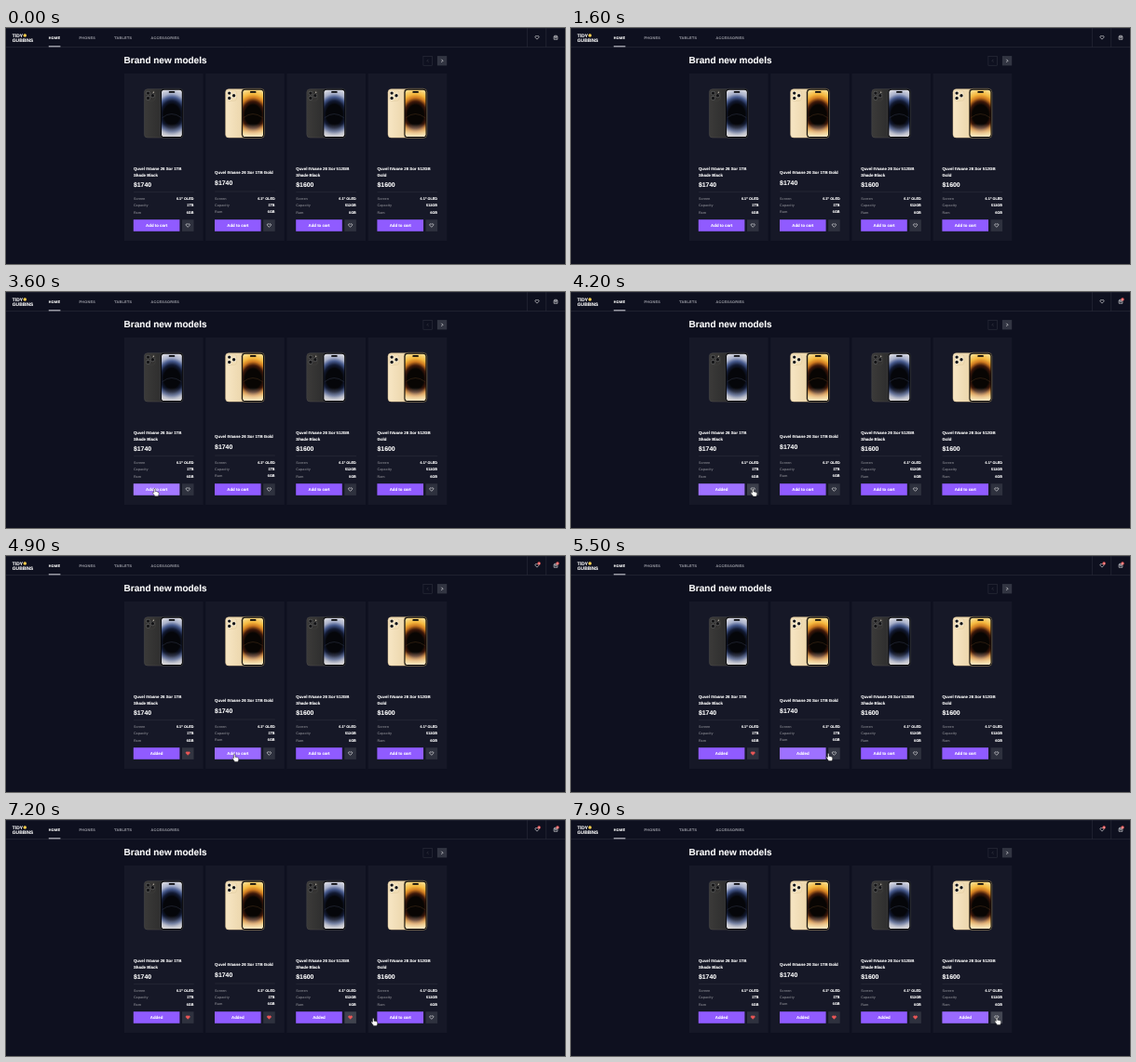
Animation, 600 px wide and 254 px high, one loop 8 s. Source, as an HTML page:

```html
<!DOCTYPE html>
<html lang="en">
<head>
<meta charset="utf-8">
<title>Shop</title>
<style>
  html, body { margin: 0; width: 100%; height: 100%; overflow: hidden; background: #0e101f; }
  svg { display: block; width: 100vw; height: 100vh; }
  text { font: 700 3.75px "Liberation Sans", Arial, sans-serif; fill: #fff; stroke: #fff; stroke-width: .1; text-rendering: geometricPrecision; }
  .title { font-size: 10px; }
  .logo { font-size: 4.9px; }
  .nav { letter-spacing: .3px; }
  .dim { fill: #8a8b95; stroke: #8a8b95; }
  .label { fill: #75767f; stroke: none; }
  .name, .btn { font-size: 4.375px; }
  .price { font-size: 6.9px; }
  .end { text-anchor: end; }
  .mid { text-anchor: middle; }
  .count { font-size: 2.4px; stroke: none; }
  .line { stroke: #323542; stroke-width: .5; fill: none; }
  .icon { stroke: #fff; stroke-width: 1.8; fill: none; }
</style>
</head>
<body>
<svg id="stage" viewBox="0 0 600 254" preserveAspectRatio="none">
  <defs>
    <path id="heart" d="M8 13.6 2.4 8C.9 6.4 1 4.2 2.4 2.9 3.9 1.6 6.2 1.7 7.5 3.1L8 3.6l.5-.5C9.8 1.7 12.1 1.6 13.6 2.9 15 4.2 15.1 6.4 13.6 8Z"/>
    <radialGradient id="glowBlack" gradientUnits="userSpaceOnUse" cx="0" cy="0" r="1" gradientTransform="translate(51.3 93.5) scale(23 28)">
      <stop offset=".38" stop-color="#05060a"/><stop offset=".52" stop-color="#121a33"/>
      <stop offset=".66" stop-color="#46598c"/><stop offset=".8" stop-color="#aab2cc"/>
      <stop offset="1" stop-color="#dcdce2"/>
    </radialGradient>
    <radialGradient id="glowGold" gradientUnits="userSpaceOnUse" cx="0" cy="0" r="1" gradientTransform="translate(51.3 94) scale(23 28)">
      <stop offset=".38" stop-color="#080503"/><stop offset=".52" stop-color="#40190a"/>
      <stop offset=".66" stop-color="#cf7a20"/><stop offset=".8" stop-color="#f6b93f"/>
      <stop offset="1" stop-color="#f9dc8c"/>
    </radialGradient>
    <linearGradient id="backBlack"><stop offset="0" stop-color="#3b3a39"/><stop offset="1" stop-color="#2a2a2a"/></linearGradient>
    <linearGradient id="backGold"><stop offset="0" stop-color="#f7e6c4"/><stop offset="1" stop-color="#e8d1a4"/></linearGradient>
    <linearGradient id="pale" x1="0" y1="0" x2="0" y2="1">
      <stop offset=".72" stop-color="#f4ead6" stop-opacity="0"/><stop offset="1" stop-color="#f4ead6" stop-opacity=".85"/>
    </linearGradient>
  </defs>
  <g id="page"></g>
  <g id="cursor">
    <path d="M-1.5 -3.1c0-1 1.5-1 1.5 0v2.5l.5 0c.5-.4 1 0 1.1.3.5-.3 1 0 1.1.4.5-.2 1 .1 1 .6v1.5c0 1-.7 1.4-.7 2.2h-3.6c0-.8-1.5-2-2.3-3.5-.4-.9.6-1.3 1.4-.3Z"
      fill="#fff" stroke="#111" stroke-width=".45" stroke-linejoin="round"/>
  </g>
</svg>
<script>
const LOOP = 8000, TICK = 100;
const ACCENT = [144, 91, 255], ACCENT_HOVER = [163, 120, 255];
const BOX = [46, 49, 62], BOX_HOVER = [74, 77, 88];

const products = [
  { name: ["Quvel tVoane 26 Sor 1TB", "Shade Black"], price: "$1740", size: "1TB", tone: "Black",
    add: 3800, like: 4400, addHover: [3300, 4100], likeHover: [4100, 4550] },
  { name: ["Quvel tVoane 26 Sor 1TB Gold"], price: "$1740", size: "1TB", tone: "Gold",
    add: 5100, like: 5700, addHover: [4800, 5400], likeHover: [5450, 5850] },
  { name: ["Quvel tVoane 26 Sor 512GB", "Shade Black"], price: "$1600", size: "512GB", tone: "Black",
    add: 6400, like: 6900, addHover: [6100, 6700], likeHover: [6700, 7050] },
  { name: ["Quvel tVoane 26 Sor 512GB", "Gold"], price: "$1600", size: "512GB", tone: "Gold",
    add: 7500, like: Infinity, addHover: [7250, 7700], likeHover: [7750, 8100] }
];

// time, x, y
const path = [
  [2400, 150, 152], [2600, 153, 178], [2700, 153, 178], [3000, 155.8, 196.2], [3400, 160, 215],
  [3900, 161, 216], [4200, 196, 215.6], [4500, 196, 215.6], [4900, 246, 217], [5200, 246, 217],
  [5500, 277, 216.2], [5800, 279, 216.2], [6200, 331, 217.2], [6500, 332, 217.2], [6800, 370, 217],
  [7000, 370, 217], [7400, 420, 217], [7600, 421, 217], [7800, 457, 216], [7900, 457.8, 216]
];

const text = (x, y, s, cls = "") => `<text x="${x}" y="${y}" class="${cls}">${s}</text>`;
const rect = (x, y, w, h, fill, more = "") =>
  `<rect x="${x}" y="${y}" width="${w}" height="${h}" fill="${fill}" ${more}/>`;
const dot = (x, y, r, fill) => `<circle cx="${x}" cy="${y}" r="${r}" fill="${fill}"/>`;
const heart = (x, y, id = "") =>
  `<use href="#heart" class="icon" ${id && `id="${id}"`} transform="translate(${x - 2.5} ${y - 2.5}) scale(.3125)"/>`;
const badge = (id, x) =>
  `<g id="${id}">${dot(x, 7.9, 1.7, "#eb5757")}<text x="${x}" y="8.8" class="count mid"></text></g>`;

function header() {
  const links = [["HOME", 45.8], ["PHONES", 78.4], ["TABLETS", 116.2], ["ACCESSORIES", 155.5]];
  return rect(0, 0, 600, .5, "#262936") +
    text(6.8, 9.8, "TIDY", "logo") + dot(20.3, 8, 1.8, "#f2c94c") + text(6.8, 14.7, "GUBBINS", "logo") +
    links.map(([s, x], i) => text(x, 11.8, s, i ? "nav dim" : "nav")).join("") +
    rect(45.8, 19.4, 12.6, 1.1, "#f1f2f9") +
    `<path class="line" d="M0 20.6H600M559.4 0V20.6M579.7 0V20.6"/>` +
    heart(570, 10.4) +
    `<g class="icon" transform="translate(587.5 7.8) scale(.3125)"><path d="M2 5 4 1.5h8L14 5v9.3H2ZM2 5h12M5.3 7.4c.3 3.5 5.1 3.5 5.4 0"/></g>` +
    badge("likes", 572.1) + badge("cart", 592);
}

function heading() {
  return text(126.6, 38.3, "Brand new models", "title") +
    `<rect x="447.9" y="30.4" width="9.8" height="9.8" class="line"/>` +
    rect(462.9, 30.1, 10.3, 10.3, "#323542") +
    `<path d="M453.4 33.9 452 35.3 453.4 36.7" fill="none" stroke="#4a4d58" stroke-width=".5"/>` +
    `<path d="M467.4 33.8 468.9 35.3 467.4 36.8" fill="none" stroke="#fff" stroke-width=".7"/>`;
}

function phones(tone) {
  const gold = tone === "Gold";
  const rim = gold ? "#cdb384" : "#4c4b4a", ring = gold ? "#fbf3e0" : "#5a5b5c";
  const lenses = [[25.8, 70.6], [25.8, 76], [30.7, 73.3]];
  return `<g transform="translate(-.3 -.5)">` +
    rect(21.7, 66.2, 24, 52.3, `url(#back${tone})`, `rx="3.6" stroke="${rim}" stroke-width=".5"`) +
    rect(23, 67.6, 10.7, 11.3, gold ? "#f3dfb7" : "#353433", `rx="3" stroke="${rim}" stroke-width=".3"`) +
    lenses.map(([x, y]) => dot(x, y, 2.4, ring) + dot(x, y, 1.7, "#141416")).join("") +
    dot(31.6, 69.7, .6, "#e8dfcf") +
    rect(38.9, 65.8, 24.6, 53.2, "#050507", `rx="4" stroke="${gold ? "#dcc08a" : "#5c5d62"}" stroke-width=".4"`) +
    rect(40.3, 67.2, 21.8, 50.4, `url(#glow${tone})`, `rx="2.8"`) +
    rect(40.3, 67.2, 21.8, 50.4, "url(#pale)", `rx="2.8" opacity="${gold ? 1 : .5}"`) +
    `<path d="M41 97Q51 89 61.5 97" fill="none" stroke="${gold ? "#a9703a" : "#6f7da3"}" stroke-width=".35" opacity=".6"/>` +
    rect(48, 68.5, 6.6, 1.8, "#050507", `rx=".9"`) + `</g>`;
}

function card(p, i) {
  const one = p.name.length === 1, up = one ? .6 : 0;
  const specs = [["Screen", "6.1\" OLED"], ["Capacity", p.size], ["Ram", "6GB"]];
  return `<g transform="translate(${127 + i * 87.2} 0)">` +
    rect(0, 49, 84.7, 180, "#161827") + phones(p.tone) +
    p.name.map((s, n) => text(9.9, (one ? 156.9 : 153.2) + n * 6.5, s, "name")).join("") +
    text(9.9, one ? 169.3 : 171.1, p.price, "price") +
    `<path class="line" d="M10 ${176.6 - up}h64.6"/>` +
    specs.map(([k, v], n) => {
      const y = 185.3 - up + n * 7.15;
      return text(9.9, y, k, "label") + text(74.4, y, v, "end");
    }).join("") +
    rect(9.8, 206.2, 49.6, 12.6, "", `id="add${i}"`) +
    `<text id="label${i}" x="34.6" y="214.2" class="btn mid"></text>` +
    rect(62, 206.3, 12.5, 12.6, "", `id="box${i}"`) + heart(68.2, 212.6, "like" + i) +
    `</g>`;
}

const $ = id => document.getElementById(id);
$("page").innerHTML = header() + heading() + products.map(card).join("");

const clamp = v => Math.max(0, Math.min(1, v));
const ease = v => v * v * (3 - 2 * v);
const mix = (a, b, k) => `rgb(${a.map((v, i) => Math.round(v + (b[i] - v) * k))})`;
const hover = (t, [from, to]) => clamp(Math.min((t - from) / 200, 1 - (t - to) / 400));

function place(t) {
  const n = path.findIndex(p => p[0] > t);
  if (n < 1) return path[n ? path.length - 1 : 0].slice(1);
  const [t0, x0, y0] = path[n - 1], [t1, x1, y1] = path[n];
  const k = ease((t - t0) / (t1 - t0));
  return [x0 + (x1 - x0) * k, y0 + (y1 - y0) * k];
}

function setBadge(id, n) {
  $(id).setAttribute("visibility", n ? "visible" : "hidden");
  $(id).lastChild.textContent = n;
}

function draw(t) {
  products.forEach((p, i) => {
    const liked = t >= p.like;
    $("add" + i).style.fill = mix(ACCENT, ACCENT_HOVER, hover(t, p.addHover));
    $("label" + i).textContent = t >= p.add ? "Added" : "Add to cart";
    $("box" + i).style.fill = mix(BOX, BOX_HOVER, hover(t, p.likeHover));
    $("like" + i).style.fill = liked ? "#eb5757" : "none";
    $("like" + i).style.stroke = liked ? "#eb5757" : "#fff";
  });
  setBadge("cart", products.filter(p => t >= p.add).length);
  setBadge("likes", products.filter(p => t >= p.like).length);
  $("cursor").setAttribute("visibility", t >= path[0][0] ? "visible" : "hidden");
  $("cursor").setAttribute("transform", `translate(${place(t)})`);
}

const start = performance.now();
function frame() {
  const t = (performance.now() - start) % LOOP;
  draw(Math.floor(t / TICK) * TICK);
  requestAnimationFrame(frame);
}
frame();
</script>
</body>
</html>
```
